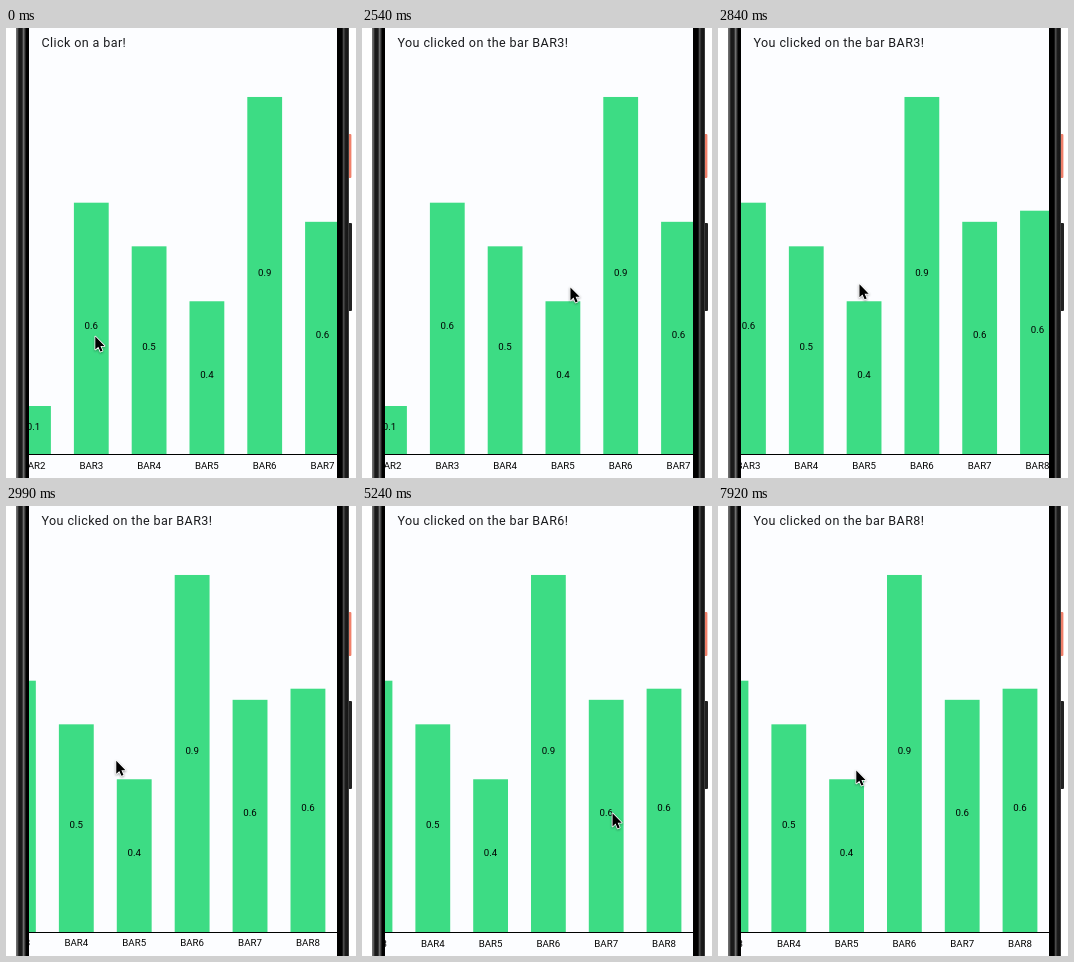
Write an HTML page that moves like this. It is 350x450 px and loops after 8 s.

```html
<!DOCTYPE html>
<html lang="en">
<head>
<meta charset="utf-8">
<title>Clickable bar chart</title>
<style>
  html, body { margin: 0; width: 100%; height: 100%; overflow: hidden; background: #fff; }
  svg { display: block; width: 100vw; height: 100vh; }
  text { font-family: Roboto, Arial, sans-serif; fill: #000; }
  .title { font-size: 12.55px; letter-spacing: 0.03125em; fill: #1a1b1e; }
  .chart text { font-size: 9.7px; text-anchor: middle; }
  .cursor { filter: drop-shadow(0.3px 1px 0.8px rgba(0, 0, 0, 0.35)); }
</style>
</head>
<body>
<svg viewBox="0 0 350 450">
  <defs>
    <clipPath id="screen"><rect x="23" width="308" height="450"/></clipPath>
    <linearGradient id="leftEdge">
      <stop offset="0" stop-color="#777"/>
      <stop offset="0.14" stop-color="#555"/>
      <stop offset="0.22" stop-color="#181818"/>
      <stop offset="0.46" stop-color="#1c1c1c"/>
      <stop offset="0.58" stop-color="#707070"/>
      <stop offset="0.7" stop-color="#303030"/>
      <stop offset="0.78" stop-color="#000"/>
    </linearGradient>
    <linearGradient id="rightEdge">
      <stop offset="0.42" stop-color="#000"/>
      <stop offset="0.56" stop-color="#555"/>
      <stop offset="0.68" stop-color="#1c1c1c"/>
      <stop offset="0.9" stop-color="#161616"/>
      <stop offset="1" stop-color="#555"/>
    </linearGradient>
  </defs>

  <rect width="350" height="450" fill="#fff"/>
  <rect x="342" y="106" width="3.4" height="44" rx="1" fill="#f0806a"/>
  <rect x="342" y="195" width="4" height="88" rx="1" fill="#222"/>
  <rect x="10" width="13" height="450" fill="url(#leftEdge)"/>
  <rect x="331" width="12" height="450" fill="url(#rightEdge)"/>
  <rect x="23" width="308" height="450" fill="#fcfdff"/>

  <text class="title" id="title" x="35.5" y="19"></text>
  <g class="chart" clip-path="url(#screen)">
    <g id="bars"></g>
    <rect x="23" y="426" width="308" height="1"/>
  </g>
  <g class="cursor" id="cursor">
    <path transform="translate(1.3 1) scale(0.87)"
          d="M0 0.6V15.6L3.5 12.3L5.9 17.9L8.3 16.9L5.9 11.4H10.6Z"
          stroke="#fff" stroke-width="1.8" stroke-linejoin="round" paint-order="stroke"/>
  </g>
</svg>
<script>
const LOOP = 8000, TICK = 149.5;
const BASE = 426, FULL = 396.7, STEP = 57.8, BAR_WIDTH = 34.8;
const SCREEN_RIGHT = 331, MAX_SCROLL = 72.3;
const DRAG_START = 16, DRAG_END = 20, DRAG_X = 195;

const values = [0.121, 0.6335, 0.5235, 0.385, 0.9, 0.5853, 0.6133]; // from BAR2 on

const clamp = (v, min, max) => Math.min(max, Math.max(min, v));
const smooth = p => p * p * (3 - 2 * p);
const easeOut = p => 1 - (1 - p) ** 4;

// Pointer travel, in ticks
const moves = [
  { from: 0, to: 2, x: 82.5, y: 307.5, ease: smooth },
  { from: 9, to: 10, x: 200, y: 293, ease: smooth },
  { from: 10, to: 14, x: 209, y: 258, ease: easeOut },
  { from: 16.7, to: 20.5, x: 104, y: 253, ease: smooth },
  { from: 20.5, to: 23, x: 150, y: 250, ease: smooth },
  { from: 23, to: 25, x: 189, y: 284, ease: smooth },
  { from: 34, to: 39, x: 291, y: 321, ease: easeOut },
  { from: 48, to: 53, x: 137, y: 263, ease: smooth }
];
const clicks = [{ at: 6, bar: 3 }, { at: 30, bar: 6 }, { at: 48, bar: 8 }];

const $ = id => document.getElementById(id);

function add(tag, attrs, label) {
  const el = document.createElementNS("http://www.w3.org/2000/svg", tag);
  for (const name in attrs) el.setAttribute(name, attrs[name]);
  if (label) el.textContent = label;
  $("bars").append(el);
}

values.forEach((value, i) => {
  const x = 10.1 + i * STEP, mid = x + BAR_WIDTH / 2, height = value * FULL;
  add("rect", { x, y: BASE - height, width: BAR_WIDTH, height, fill: "#3ddc84" });
  add("text", { x: mid, y: BASE - height / 2 + 0.3 }, value.toFixed(1));
  add("text", { x: mid, y: 440.5 }, "BAR" + (i + 2));
});

function pointerAt(tick) {
  let x = 88, y = 307;
  for (const move of moves) {
    const p = move.ease(clamp((tick - move.from) / (move.to - move.from), 0, 1));
    x += (move.x - x) * p;
    y += (move.y - y) * p;
  }
  return { x, y };
}

// The content follows the pointer while it is dragged
function scrollAt(tick) {
  const { x } = pointerAt(clamp(tick, DRAG_START, DRAG_END));
  return clamp(DRAG_X - x, 0, MAX_SCROLL);
}

// Overscroll pulls the content wider, then lets go
function stretchAt(tick) {
  return 1 + 0.0105 * Math.sin(Math.PI * clamp((tick - 19.7) / 5.3, 0, 1));
}

function titleAt(tick) {
  const last = clicks.filter(click => click.at <= tick).pop();
  return last ? `You clicked on the bar BAR${last.bar}!` : "Click on a bar!";
}

function draw(time) {
  // The screen refreshes in discrete ticks
  const tick = Math.floor((time % LOOP + 4) / TICK);
  const { x, y } = pointerAt(tick);
  $("cursor").setAttribute("transform", `translate(${x} ${y})`);
  $("bars").setAttribute("transform",
    `translate(${SCREEN_RIGHT} 0) scale(${stretchAt(tick)} 1) translate(${-SCREEN_RIGHT - scrollAt(tick)} 0)`);
  $("title").textContent = titleAt(tick);
}

const start = performance.now();
function loop() {
  draw(performance.now() - start);
  requestAnimationFrame(loop);
}
loop();
</script>
</body>
</html>
```
